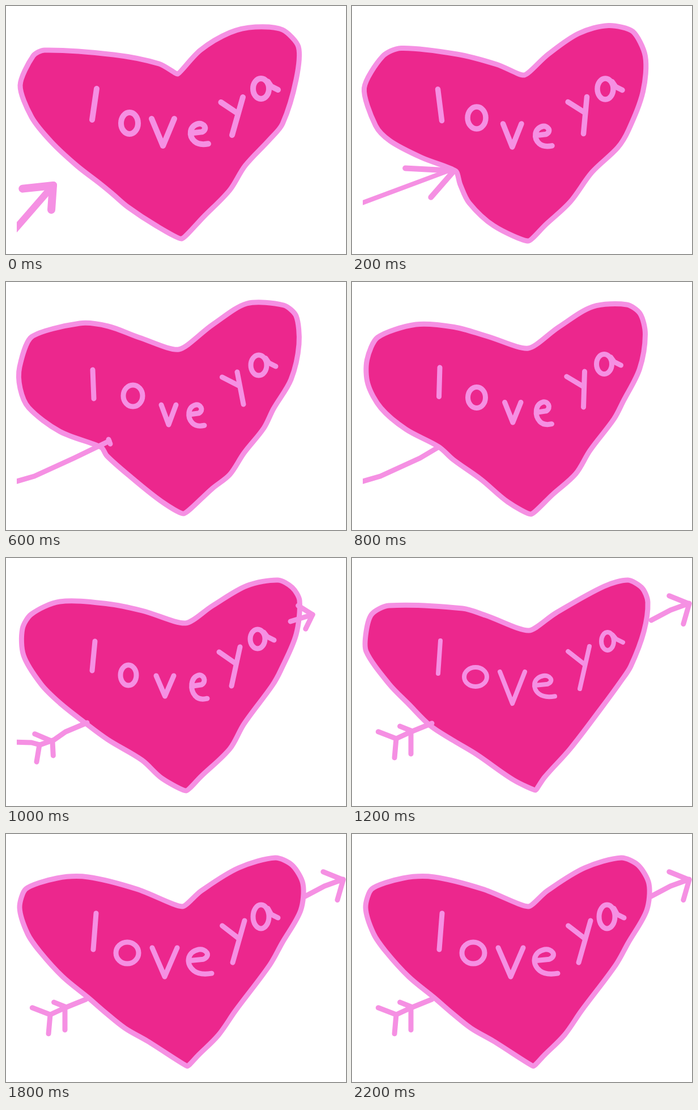
These frames come from a looping animation (600x438 px, 2400 ms). An HTML page with a canvas:

```html
<!DOCTYPE html>
<html lang="en">
<head>
<meta charset="utf-8">
<title>love ya</title>
<style>
html, body { margin: 0; width: 100%; height: 100%; overflow: hidden; background: #fff; }
canvas { display: block; width: 600px; height: 438px; }
</style>
</head>
<body>
<canvas id="stage" width="600" height="438"></canvas>
<script>
const ctx = document.getElementById("stage").getContext("2d");
const LIGHT = "#f590e3", HOT = "#ec278d";
const STEP = 200, PAPER_LEFT = 19;

ctx.lineCap = ctx.lineJoin = "round";
ctx.strokeStyle = LIGHT;
ctx.fillStyle = HOT;

function stroke(width) {
  ctx.lineWidth = width;
  ctx.stroke();
}

function line(width, ...xy) {
  ctx.beginPath();
  for (let i = 0; i < xy.length; i += 2) ctx.lineTo(xy[i], xy[i + 1]);
  stroke(width);
}

function ring(width, x, y, rx, ry) {
  ctx.beginPath();
  ctx.ellipse(x, y, rx, ry, 0, 0, 2 * Math.PI);
  stroke(width);
}

// Closed spline: gentle bends become round, sharp turns stay corners.
function heart(xy) {
  const n = xy.length / 2;
  const point = i => [xy[2 * (i % n)], xy[2 * (i % n) + 1]];
  const gap = (p, q) => Math.hypot(q[0] - p[0], q[1] - p[1]) || 1;
  const tangent = i => {
    const a = point(i + n - 1), b = point(i), c = point(i + 1);
    const dot = (b[0] - a[0]) * (c[0] - b[0]) + (b[1] - a[1]) * (c[1] - b[1]);
    const k = Math.max(0, dot) / (gap(a, b) * gap(b, c)) / gap(a, c) / 3;
    return [(c[0] - a[0]) * k, (c[1] - a[1]) * k];
  };
  ctx.beginPath();
  ctx.moveTo(xy[0], xy[1]);
  for (let i = 0; i < n; i++) {
    const p = point(i), q = point(i + 1), s = tangent(i), t = tangent(i + 1), d = gap(p, q);
    ctx.bezierCurveTo(p[0] + s[0] * d, p[1] + s[1] * d, q[0] - t[0] * d, q[1] - t[1] * d, q[0], q[1]);
  }
  ctx.closePath();
  ctx.fill();
  stroke(9);
}

// Two strokes leaving a point on either side of a direction in degrees.
function barbs(width, x, y, back, spread, upper, lower) {
  const end = (deg, len) => [x + len * Math.cos(deg * Math.PI / 180), y + len * Math.sin(deg * Math.PI / 180)];
  line(width, ...end(back + spread, upper), x, y, ...end(back - spread, lower));
}

// l, y: top, lean, height. o, a: centre, radii. v, e: box.
const glyphs = {
  l: (w, x, y, dx, h) => line(w, x, y, x + dx, y + h),
  o: ring,
  v: (w, x, y, dx, h) => line(w, x, y, x + dx / 2, y + h, x + dx, y),
  e(w, x, y, dx, h) {
    const X = k => x + k * dx, Y = k => y + k * h;
    ctx.beginPath();
    ctx.moveTo(X(0.05), Y(0.46));
    ctx.lineTo(X(0.65), Y(0.4));
    ctx.bezierCurveTo(X(1), Y(0.25), X(0.75), Y(-0.05), X(0.45), Y(0));
    ctx.bezierCurveTo(X(-0.05), Y(0.1), X(-0.1), Y(0.6), X(0.25), Y(0.87));
    ctx.quadraticCurveTo(X(0.5), Y(1.06), X(1), Y(0.98));
    stroke(w);
  },
  y(w, x, y, dx, h) {
    line(w, x, y, x + dx, y + h);
    line(w, x - 31 + dx * 0.4, y + 9, x + dx * 0.42 - 2, y + h * 0.42);
  },
  a(w, x, y, rx, ry) {
    ring(w, x, y, rx, ry);
    line(w, x + rx - 2, y - ry * 0.7, x + rx + 4, y - 4, x + rx + 16, y + 2);
  }
};

// Outlines run from the notch over the left lobe to the tip and back.
const touch = {
  pen: [10],
  heart: [303,120, 270,102, 190,86, 68,78, 48,88, 25,140, 45,196, 80,240, 125,282, 165,313,
    187,331, 215,355, 265,388, 310,411, 350,371, 395,325, 422,282, 465,236, 488,208, 512,130,
    516,72, 488,42, 440,37, 395,47, 343,78],
  l: [160,146,-8,55], o: [218,207,15,19], v: [257,199,40,48],
  e: [325,208,32,36], y: [418,161,-19,67], a: [450,146,14,18]
};
const dent = {
  pen: [9],
  heart: [305,124, 240,104, 180,84, 105,71, 60,90, 18,150, 38,226, 55,237, 120,253, 201,270,
    195,300, 198,340, 235,388, 312,419, 335,400, 375,367, 425,305, 473,264, 488,230, 515,172,
    519,105, 503,48, 465,32, 405,50, 350,92],
  l: [143,148,22,56], o: [222,188,17,20], v: [276,217,25,34],
  e: [321,217,28,34], y: [411,160,7,63], a: [444,147,14,19]
};
const pierce = {
  pen: [9],
  heart: [305,119, 235,98, 180,78, 130,73, 45,97, 24,150, 25,188, 40,222, 95,264, 168,292,
    178,307, 215,340, 275,388, 314,409, 365,364, 395,340, 420,302, 455,258, 472,224, 503,172,
    517,110, 512,60, 490,41, 425,38, 365,75],
  l: [153,155,2,51], o: [224,201,17,19], v: [274,217,26,35],
  e: [322,217,28,37], y: [408,159,11,57], a: [446,147,14,18]
};
const emerge = {
  pen: [9],
  heart: [317,115, 240,93, 180,81, 95,77, 45,99, 29,125, 31,172, 62,223, 95,256, 138,290,
    180,321, 240,357, 275,389, 318,411, 345,385, 395,337, 420,293, 470,225, 485,198, 512,135,
    518,75, 505,52, 480,39, 425,49, 365,84],
  l: [157,147,-5,52], o: [216,207,14,18], v: [265,208,31,36],
  e: [327,207,28,42], y: [413,157,-15,69], a: [444,143,13,17]
};
const beatA = {
  pen: [8],
  heart: [312,128, 235,101, 195,89, 65,84, 35,99, 25,130, 25,165, 65,222, 100,258, 138,296,
    180,323, 220,347, 285,392, 324,410, 340,387, 385,337, 440,265, 475,217, 492,191, 515,130,
    522,78, 512,53, 487,39, 445,50, 360,97],
  l: [156,146,-4,58], o: [218,210,20,17], v: [261,201,44,56],
  e: [321,208,37,37], y: [419,156,-17,75], a: [451,147,11,16]
};
const beatB = {
  pen: [9],
  heart: [311,128, 230,97, 145,76, 90,78, 35,97, 24,130, 38,176, 60,208, 100,252, 145,289,
    175,315, 210,343, 250,366, 320,410, 340,390, 375,355, 405,312, 465,232, 487,193, 520,135,
    524,88, 505,55, 475,42, 410,60, 345,100],
  l: [159,140,-5,64], o: [214,210,20,19], v: [258,201,44,51],
  e: [321,204,42,43], y: [421,153,-21,74], a: [450,146,14,21]
};

function halfway(p, q) {
  const pose = {};
  for (const key in p) pose[key] = p[key].map((v, i) => (v + q[key][i]) / 2);
  return pose;
}

const arrows = {
  near() {
    line(12, 12, 399, 84, 316);
    barbs(14, 83, 317, 134, 40, 54, 43);
  },
  poke(x, y) {
    line(8, 12, 350, x - 10, y);
    barbs(10, x, y, 157, 26, 86, 62);
  },
  sink(x, y) {
    line(9, 12, 354, 50, 343, 120, 311, x, y);
  },
  emerge() {
    line(9, 502, 112, 541, 100);
    barbs(9, 541, 100, 164, 48, 30, 28);
    line(9, 12, 325, 45, 326, 60, 330, 85, 321, 105, 307, 143, 291);
    barbs(9, 82, 324, 145, 58, 34, 25);
    line(9, 59, 330, 54, 360);
  },
  through() {
    line(9, 528, 110, 562, 92, 595, 80);
    barbs(9, 595, 81, 154, 48, 38, 37);
    line(9, 141, 292, 104, 307, 78, 319);
    barbs(9, 78, 319, 148, 53, 34, 34);
    barbs(9, 104, 305, 146, 56, 21, 41);
  }
};

const first = [
  [touch, arrows.near],
  [halfway(touch, dent), () => arrows.poke(180, 291)],
  [dent, () => arrows.poke(198, 271)],
  [pierce, () => { arrows.sink(182, 281); line(9, 181, 278, 184, 286); }],
  [halfway(pierce, emerge), () => arrows.sink(152, 292)],
  [emerge, arrows.emerge]
];
const beats = [[beatA, arrows.through], [beatB, arrows.through]];
const scenes = [...first, ...beats, ...beats, ...beats];

function draw([pose, arrow]) {
  ctx.clearRect(0, 0, 600, 438);
  heart(pose.heart);
  for (const name in glyphs) glyphs[name](pose.pen[0], ...pose[name]);
  ctx.save();
  ctx.beginPath();
  ctx.rect(PAPER_LEFT, 0, 600, 438);
  ctx.clip();
  arrow();
  ctx.restore();
}

const start = performance.now();
let shown = -1;

function tick() {
  const i = Math.floor(Math.max(0, performance.now() - start) / STEP) % scenes.length;
  if (i !== shown) draw(scenes[shown = i]);
  requestAnimationFrame(tick);
}
tick();
</script>
</body>
</html>
```
